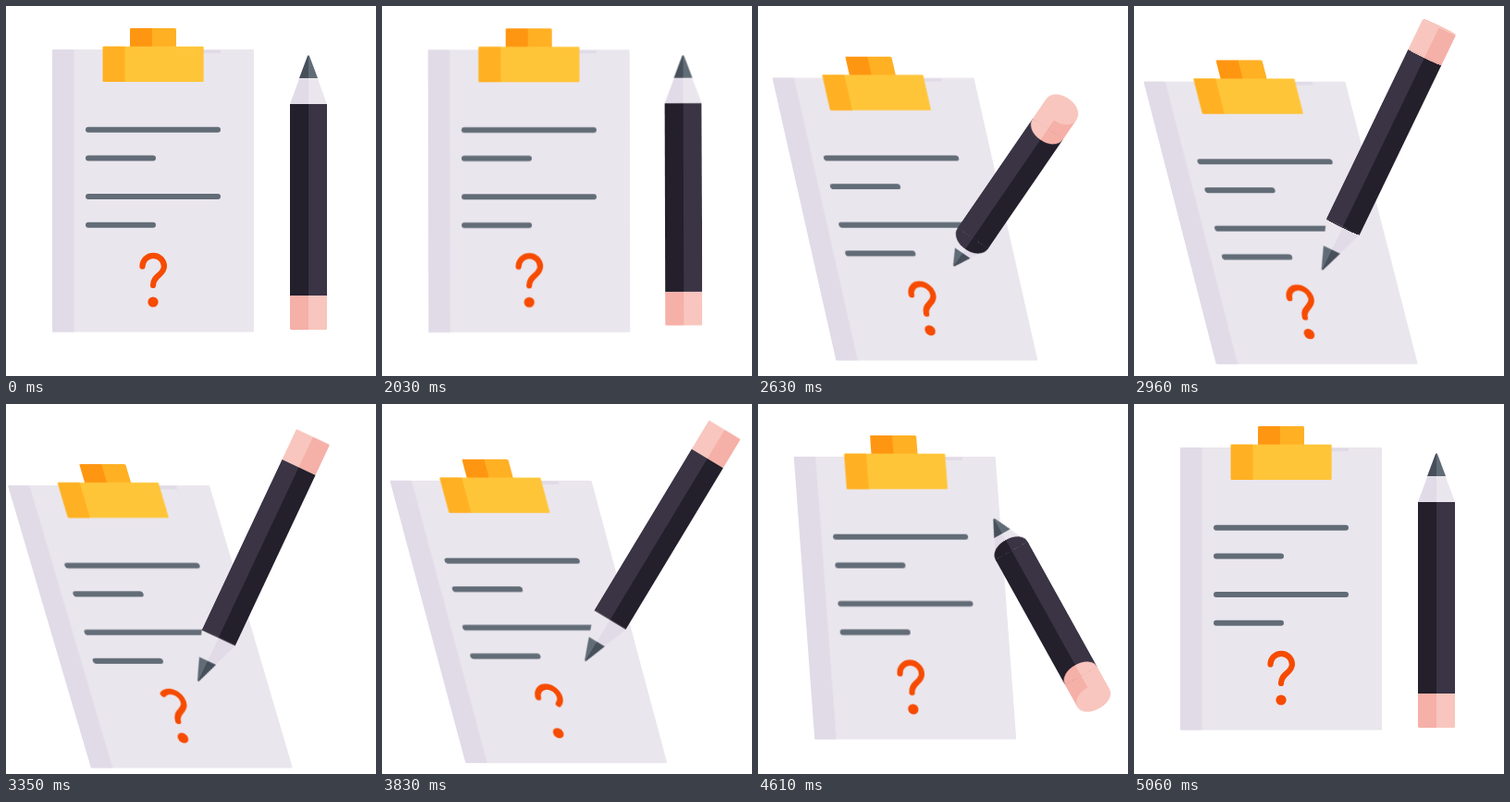
Animation of 400x400 px, one loop 5.09 s. Source, as an HTML page without scripts:

```html
<!DOCTYPE html>
<html lang="en">
<head>
<meta charset="utf-8">
<title>Clipboard and pencil</title>
<style>
  html, body { margin: 0; width: 100%; height: 100%; overflow: hidden; background: #fff; }
  .stage { position: relative; width: 400px; height: 400px; overflow: hidden; }
  .stage > svg { position: absolute; left: 0; top: 0; }

  .board { transform-origin: 159px 200px; animation: lean 5090ms linear infinite; }
  .line { stroke: #626c77; stroke-width: 6; stroke-linecap: round; }
  .hook {
    fill: none; stroke: #f64b00; stroke-width: 6.2; stroke-linecap: round;
    stroke-dasharray: 100 200; animation: write 5090ms linear infinite;
  }

  /* The pencil hangs from its tip; discs give it volume when it tilts. */
  .pencil {
    position: absolute; left: 0; top: 0; width: 0; height: 0;
    transform-style: preserve-3d; animation: pencil 5090ms linear infinite;
  }
  .pencil svg { position: absolute; left: -20px; top: 0; display: block; }
  .disc {
    position: absolute; left: -20px; top: calc(var(--y) - 20px);
    width: 40px; height: 40px; border-radius: 50%;
    background: linear-gradient(90deg, var(--a) 50%, var(--b) 50%);
    transform: rotateX(90deg);
  }
  .collar { --y: 54px; --a: #231f2b; --b: #3a3445; }
  .seam { --y: 261px; --a: #f5b0a8; --b: #f8c6be; }
  .cap { --y: 298px; --a: #f8c6be; --b: #f8c6be; }

  @keyframes lean {
    0%, 39.8% { transform: translate(0, 0) skewX(0deg); }
    39.88% { transform: translate(0, .3px) skewX(.1deg); animation-timing-function: cubic-bezier(.4, .1, .6, 1); }
    49.9% { transform: translate(0, 28px) skewX(11.7deg); }
    51.67% { transform: translate(0, 30.7px) skewX(12.7deg); }
    60.51% { transform: translate(-.5px, 36px) skewX(15deg); animation-timing-function: ease-in-out; }
    65.82% { transform: translate(-3px, 41px) skewX(16.4deg); animation-timing-function: ease-in-out; }
    71.12% { transform: translate(-.5px, 37px) skewX(15.2deg); }
    75.25% { transform: translate(-.5px, 35.8px) skewX(15deg); }
    81.73% { transform: translate(0, 34px) skewX(14.1deg); }
    84.68% { transform: translate(0, 30px) skewX(12.7deg); }
    92.34% { transform: translate(0, 4px) skewX(1.7deg); animation-timing-function: ease-out; }
    99.41%, 100% { transform: translate(0, 0) skewX(0deg); }
  }

  @keyframes write {
    0%, 62.8% { stroke-dashoffset: 0; }
    65.82% { stroke-dashoffset: -16; }
    70.2% { stroke-dashoffset: -102; }
    70.21% { stroke-dashoffset: 102; }
    75.25% { stroke-dashoffset: 27; }
    77.6%, 100% { stroke-dashoffset: 0; }
  }

  @keyframes pencil {
    0%, 39.8% { transform: translate(327px, 52px) rotateZ(0deg) rotateX(0deg) scaleY(1); }
    39.88% { transform: translate(326px, 51.5px) rotateZ(0deg) rotateX(0deg) scaleY(.986); }
    42.83% { transform: translate(255px, 105px) rotateZ(-22deg) rotateX(45deg) scaleY(.986); }
    45.78% { transform: translate(229px, 199px) rotateZ(-72deg) rotateX(70deg) scaleY(.986); }
    48.72% { transform: translate(206px, 235px) rotateZ(-120deg) rotateX(62deg) scaleY(.986); }
    51.67% { transform: translate(211px, 282px) rotateZ(-145.5deg) rotateX(45.5deg) scaleY(.986); }
    58.74% { transform: translate(202px, 287px) rotateZ(-155deg) rotateX(0deg) scaleY(.986); }
    60.51% { transform: translate(202px, 289px) rotateZ(-155deg) rotateX(0deg) scaleY(.986); }
    65.82% { transform: translate(207px, 301px) rotateZ(-154.8deg) rotateX(0deg) scaleY(.986); animation-timing-function: ease-in-out; }
    71.12% { transform: translate(214px, 277px) rotateZ(-152deg) rotateX(0deg) scaleY(.986); }
    75.25% { transform: translate(219px, 279px) rotateZ(-148.9deg) rotateX(0deg) scaleY(.986); }
    81.73% { transform: translate(198px, 285px) rotateZ(-147deg) rotateX(0deg) scaleY(.986); }
    84.68% { transform: translate(198px, 290px) rotateZ(-125.8deg) rotateX(63deg) scaleY(.986); }
    87.62% { transform: translate(233px, 254px) rotateZ(-85deg) rotateX(72deg) scaleY(.986); }
    89.98% { transform: translate(240px, 145px) rotateZ(-35deg) rotateX(50deg) scaleY(.986); }
    92.34% { transform: translate(296px, 60px) rotateZ(-12deg) rotateX(14deg) scaleY(.986); animation-timing-function: ease-out; }
    99.41%, 100% { transform: translate(327px, 52px) rotateZ(0deg) rotateX(0deg) scaleY(1); }
  }
</style>
</head>
<body>
<div class="stage">
  <svg width="400" height="400" viewBox="0 0 400 400">
    <g class="board">
      <rect x="50" y="47" width="218" height="305.5" rx="1" fill="#eae6ed"/>
      <path d="M51 47H73.500V352.500H51Q50 352.500 50 351.500V48Q50 47 51 47Z" fill="#e1dbe8"/>
      <path d="M213 47.500H232V51H213Z" fill="#e1dbe8"/>
      <rect x="134" y="24" width="50" height="24" rx="1.500" fill="#ffb023"/>
      <path d="M135.500 24H158V46H134V25.500Q134 24 135.500 24Z" fill="#ff9612"/>
      <rect x="104.700" y="43.800" width="109" height="38.200" rx="1" fill="#ffc539"/>
      <path d="M105.700 43.800H128.500V82H105.700Q104.700 82 104.700 81V44.800Q104.700 43.800 105.700 43.800Z" fill="#ffb023"/>
      <path class="line" d="M89 133.700H229M89 164.500H159M89 206H229M89 236.800H159"/>
      <path class="hook" pathLength="100" d="M147.500 281.500A11.700 11.700 0 0 1 170.900 281.500C170.900 291 159 291 159 302"/>
      <circle cx="159" cy="320" r="5.600" fill="#f64b00"/>
    </g>
  </svg>

  <div class="pencil">
    <svg width="40" height="298" viewBox="0 0 40 298">
      <path d="M20 1V54H0L18.800 3Z" fill="#e1dbe8"/>
      <path d="M20 1V54H40L21.200 3Z" fill="#eae6ed"/>
      <path d="M20 1V26H10L18.800 2.500Z" fill="#464f5a"/>
      <path d="M20 1V26H30L21.200 2.500Z" fill="#606c76"/>
      <path d="M0 54H20V261H0Z" fill="#231f2b"/>
      <path d="M20 54H40V261H20Z" fill="#3a3445"/>
      <path d="M0 261H20V298H1L0 297Z" fill="#f5b0a8"/>
      <path d="M20 261H40V297L39 298H20Z" fill="#f8c6be"/>
    </svg>
    <div class="disc collar"></div>
    <div class="disc seam"></div>
    <div class="disc cap"></div>
  </div>
</div>
</body>
</html>
```
